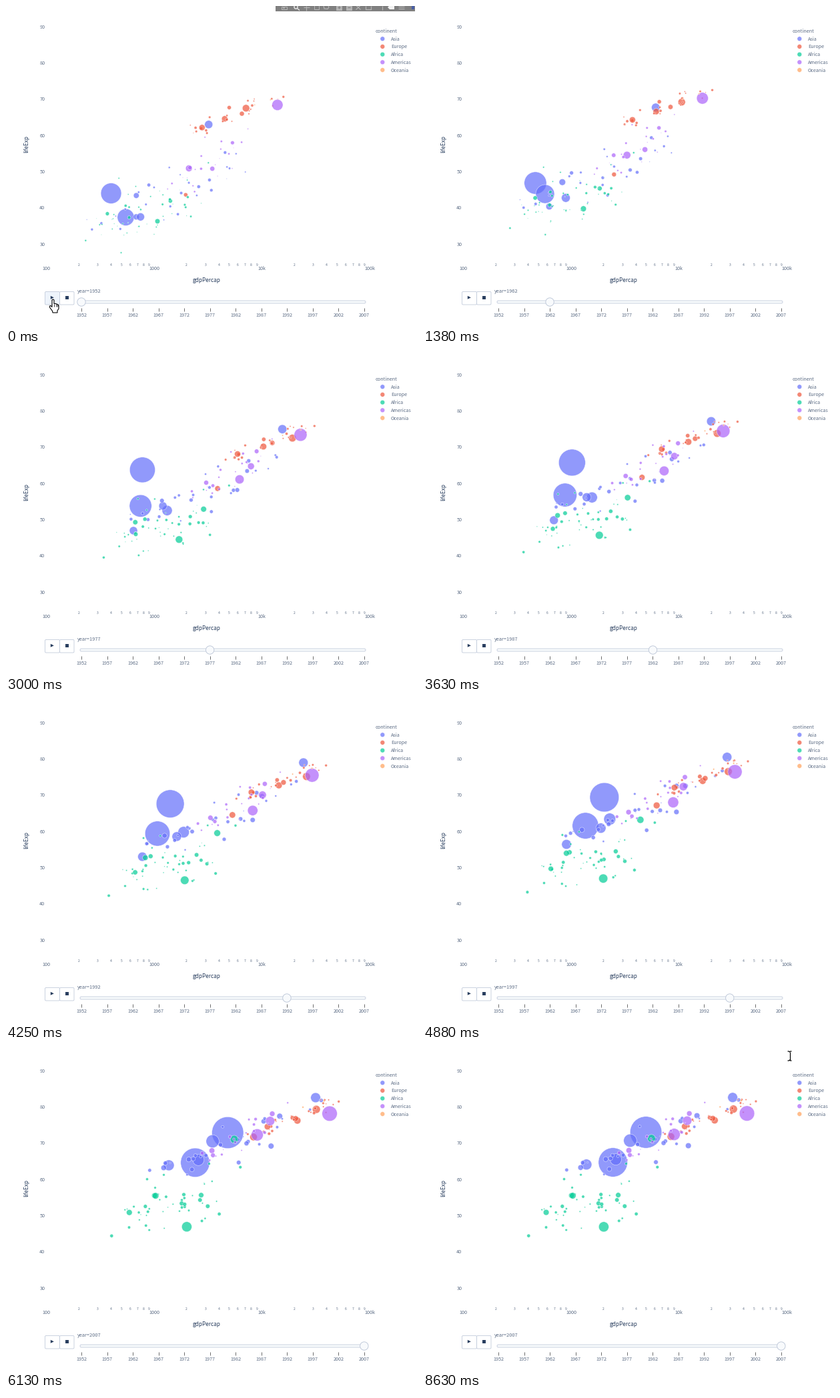
Write a matplotlib script that moves like this. It is 616x480 px and loops after 8.76 s.

```python
import numpy as np
import matplotlib.pyplot as plt
from matplotlib.animation import FuncAnimation
from matplotlib.patches import Circle, FancyBboxPatch, Polygon, Rectangle

W, H, DPI = 616, 480, 100
PX = 72 / DPI
STEP_MS, N_FRAMES = 60, 146
TICKS, TICK_MS = 70, 8760 / 70
START_MS, YEAR_MS, MOVE_MS = 12, 514, 500
INK, EDGE, PALE = "#2a3f5f", "#bec8d9", "#f8fafc"
plt.rcParams["font.family"] = ["Noto Sans CJK JP", "DejaVu Sans"]

COLORS = {"Asia": "#636efa", "Europe": "#ef553b", "Africa": "#00cc96",
          "Americas": "#ab63fa", "Oceania": "#ffa15a"}
U = np.linspace(0, 1, 12)

# Largest bubbles: populations (millions), then (income, life expectancy)
# at the start, middle and end of the period.
LARGE = {
    "Asia": [((372, 1110), (547, 37.4), (815, 55.5), (2452, 64.7)),
             ((47, 150), (684, 37.5), (668, 48.5), (1391, 64.1)),
             ((82, 223), (750, 37.5), (1450, 54.5), (3541, 70.7)),
             ((86, 127), (3217, 63), (18000, 76.2), (31656, 82.6)),
             ((41, 169), (685, 43.4), (1310, 55.1), (2606, 65.5))],
    "Europe": [((69, 82), (7144, 67.5), (21200, 73.2), (32170, 79.4)),
               ((22, 71), (1969, 43.6), (4250, 60.3), (8458, 71.8))],
    "Africa": [((33, 135), (1077, 36.3), (1780, 45.2), (2014, 46.9)),
               ((22, 80), (1419, 41.9), (3140, 54.6), (5581, 71.3))],
    "Americas": [((158, 301), (13990, 68.4), (24500, 74), (42952, 78.2)),
                 ((57, 190), (2109, 50.9), (6850, 62.4), (9066, 72.4)),
                 ((30, 109), (3478, 50.8), (8600, 66.3), (11978, 76.2))],
}

# Everyone else: count, median population, its growth, (log income, life)
# at start and end, income spread, life per decade of income, life noise, bend
CLOUDS = {
    "Asia": (27, 7, 2.6, (3.2, 46), (3.7, 70.5), .4, 11, 4, .35),
    "Europe": (28, 8, 1.2, (3.74, 65.5), (4.33, 77.3), .22, 11, 1.3, .15),
    "Africa": (50, 3.2, 3.3, (2.95, 39), (3.15, 53.5), .27, 8, 4.5, .8),
    "Americas": (22, 4, 2.4, (3.5, 53), (3.86, 73), .2, 13, 3, .4),
    "Oceania": (2, 4, 2.2, (4.01, 69.2), (4.47, 80.7), .05, 8, .2, -.1),
}


def px_x(log_income):
    return 60.3 + 161.5 * (log_income - 2)


def px_y(life):
    return 31 + 5.435 * (90 - life)


def diameter(pop):
    return 47.5 * np.sqrt(pop / 1318.7)


def ramp(a, b):
    return a + (b - a) * U


def parabola(a, b, c):
    """Curve through the start, middle and end values."""
    return ramp(a, c) + (4 * b - 2 * a - 2 * c) * U * (1 - U)


def track(pops, log_income, life):
    return px_x(log_income), px_y(life), ramp(*diameter(np.array(pops)))


def giant():
    """The biggest bubble: steady growth with one sharp early dip."""
    life = 57.5 + 15.5 * U - 13.5 * np.exp(-U / .14)
    life -= 12 * np.exp(-((U - 2 / 11) / .05) ** 2)
    return track((556, 1318.7), parabola(*np.log10([400, 900, 4959])), life)


def large(pops, *points):
    income, life = zip(*points)
    return track(pops, parabola(*np.log10(income)), parabola(*life))


def cloud(rng, n, pop, growth, start, end, spread, slope, noise, bend):
    (g0, l0), (g1, l1) = start, end
    for z in rng.permutation(np.linspace(-1.7, 1.7, n)):
        d0, d1 = spread * (z + rng.normal(0, .35, 2))
        e0, e1 = rng.normal(0, noise, 2)
        p = pop * np.exp(np.clip(rng.normal(0, 1.1), -2.2, 1.8))
        first = l0 + slope * d0 + e0
        last = min(l1 + slope * d1 + .5 * e0 + .6 * e1, 82)
        yield track((p, p * growth * rng.uniform(.8, 1.2)),
                    ramp(g0 + d0, g1 + d1) + .25 * U * (1 - U),
                    ramp(first, last) + bend * (last - first) * U * (1 - U))


def build_tracks():
    rng = np.random.default_rng(7)
    tracks, hues = [giant()], [COLORS["Asia"]]
    for name, spec in CLOUDS.items():
        group = [large(*row) for row in LARGE.get(name, [])]
        group += cloud(rng, *spec)
        tracks += group
        hues += [COLORS[name]] * len(group)
    return np.array(tracks), hues


fig = plt.figure(figsize=(W / DPI, H / DPI), dpi=DPI, facecolor="white")
ax = fig.add_axes([0, 0, 1, 1])
ax.set_xlim(0, W)
ax.set_ylim(H, 0)
ax.axis("off")


def label(x, y, s, size=7.2, ha="center", alpha=.75):
    return ax.text(x, y + .36 * size, s, fontsize=size * PX, ha=ha,
                   va="baseline", color=INK, alpha=alpha)


def line(xs, ys, color, width=1, z=3):
    return ax.plot(xs, ys, color=color, lw=width * PX, zorder=z,
                   solid_capstyle="butt")[0]


def rect(x, y, w, h, fill, edge="none", z=2):
    return ax.add_patch(Rectangle((x, y), w, h, fc=fill, ec=edge,
                                  lw=PX, zorder=z))


def disc(x, y, r, fill, edge="none", width=1, z=4):
    return ax.add_patch(Circle((x, y), r, fc=fill, ec=edge,
                               lw=width * PX, zorder=z))


def rounded(x, y, w, h, r, fill):
    return ax.add_patch(FancyBboxPatch(
        (x, y), w, h, boxstyle=f"round,pad=0,rounding_size={r}",
        fc=fill, ec=EDGE, lw=.8 * PX, zorder=2))


def dots(x, y, sizes, hues):
    return ax.scatter(x, y, s=(sizes * PX) ** 2, c=hues, alpha=.7,
                      edgecolors="white", linewidths=.58 * PX, zorder=2)


def slot(i):
    return 113 + 38.53 * i


def draw_axes():
    for v in range(30, 91, 10):
        label(58.3, px_y(v), str(v), ha="right")
    for i, s in enumerate(["100", "1000", "10k", "100k"]):
        label(px_x(2 + i) + .5, 393, s)
        if i < 3:
            for d in range(2, 10):
                label(px_x(2 + i + np.log10(d)), 388.7, str(d), 5)
    label(300.5, 411, "gdpPercap", 8.3, alpha=1)
    ax.text(31, 207, "lifeExp", fontsize=8.3 * PX, rotation=90,
            ha="center", va="center", color=INK)


def draw_legend():
    label(554, 37.5, "continent", 7.4, "left")
    ys = 49.2 + 11.7 * np.arange(5)
    dots(np.full(5, 564.3), ys, np.full(5, 6.8), list(COLORS.values()))
    for name, y in zip(COLORS, ys):
        label(577, y, name, 7.2, "left")


def draw_controls():
    play = rounded(58.5, 428.5, 22, 19.5, 1.5, "white")
    rounded(80.5, 428.5, 21.5, 19.5, 1.5, "white")
    ax.add_patch(Polygon([(66.8, 434.8), (66.8, 439.8), (71.8, 437.3)],
                         fc=INK, zorder=3))
    rect(89.2, 435.2, 4.4, 4.4, INK)
    rounded(111, 442, 428, 4, 2, PALE)
    for i in range(12):
        line([slot(i)] * 2, [452.8, 458], "#333333", .7)
        label(slot(i), 463.6, str(1952 + 5 * i))
    return play


def draw_toolbar():
    bar, dim, lit = "#808080", "#b4b4b4", "#f2f2f2"
    parts = [rect(404, 0, 208.5, 8.3, bar, z=5)]

    def stroke(xs, ys, c=dim):
        parts.append(line(xs, ys, c, 1.2, 6))

    def box(x, y, w, h, fill="none"):
        parts.append(rect(x, y, w, h, fill, dim, 6))

    box(412.5, .5, 8, 4.5)
    parts.append(disc(416.5, 2.8, 1.3, dim, z=6))
    parts.append(disc(434.5, 1.5, 2.6, "none", lit, 1.3, 6))
    stroke([436.3, 440], [3.3, 6.5], lit)
    stroke([445.5, 454.5], [2, 2])
    stroke([450, 450], [0, 6.5])
    box(461.5, -2, 7, 7)
    stroke([476, 477, 482, 484, 483], [0, 4, 4.5, 2, 0])
    for x in (495, 510):
        box(x, -2, 7.5, 7.5, dim)
        stroke([x + 1.5, x + 6], [1.8, 1.8], bar)
    stroke([498.7, 498.7], [0, 4], bar)
    stroke([524.5, 531.5], [-1, 5.5])
    stroke([531.5, 524.5], [-1, 5.5])
    stroke([539, 539, 547, 547], [0, 5, 5, 0])
    stroke([563.5, 563.5], [0, 5.5])
    parts.append(ax.add_patch(Polygon(
        [(572, 2), (575, -1), (582, -1), (582, 5), (575, 5)],
        fc=lit, zorder=6)))
    for y in (.8, 4):
        stroke([588, 597], [y, y])
    parts.append(rect(607.5, 0, 4.5, 4.5, "#4a5fa5", z=6))
    return parts


def draw_hand():
    outline = [(69, 441), (70.5, 440), (72, 441), (72, 446.5), (74.5, 446.5),
               (77, 447.5), (79, 449), (79, 454), (77, 457), (77, 460),
               (70, 460), (69.5, 457.5), (65.5, 452), (65.5, 450),
               (67, 449.5), (69, 451.5)]
    parts = [ax.add_patch(Polygon(outline, fc="white", ec="black",
                                  lw=1.1 * PX, zorder=8))]
    for x in (72, 74.5, 76.8):
        parts.append(line([x, x], [447, 450.5], "black", .8, 9))
    return parts


def draw_beam(x=549.5, y=9):
    serif = x + np.array([-3, -1, 0, 1, 3])
    parts = [line([x, x], [y - 6, y + 6], "black", 1.2, 8)]
    for s in (-1, 1):
        parts.append(line(serif, y + s * np.array([7, 7, 6, 7, 7]),
                          "black", 1.2, 8))
    return parts


tracks, hues = build_tracks()
draw_axes()
draw_legend()
play_button = draw_controls()
bubbles = dots(*tracks[:, :, 0].T, hues)
bubbles.set_clip_path(Rectangle((60, 20), 485, 366, transform=ax.transData))
knob = disc(slot(0), 444, 6.2, PALE, EDGE, .9)
year = label(107, 427.8, "year=1952", 7.4, "left")
toolbar, hand, beam = draw_toolbar(), draw_hand(), draw_beam()


def ease(u):
    u = min(u, 1)
    return 4 * u**3 if u < .5 else 1 - 4 * (1 - u)**3


def show(parts, on):
    for p in parts:
        p.set_visible(on)


def update(i):
    # The picture advances in 70 even ticks per loop.
    t = min(int((i + 1) * STEP_MS / TICK_MS), TICKS - 1) * TICK_MS
    step = int(np.clip((t - START_MS) // YEAR_MS, 0, 11))
    since = max(t - START_MS - YEAR_MS * step, 0)
    prev = max(step - 1, 0)

    f = min(since / MOVE_MS, 1)
    now = tracks[:, :, prev] * (1 - f) + tracks[:, :, step] * f
    bubbles.set_offsets(now[:, :2])
    bubbles.set_sizes((now[:, 2] * PX) ** 2)

    knob.center = (slot(prev + (step - prev) * ease(since / 150)), 444)
    year.set_text(f"year={1952 + 5 * step}")

    hovering = t < 240
    play_button.set_facecolor("#eef4fb" if hovering else "white")
    show(hand, hovering)
    show(toolbar, t < 490)
    show(beam, t > 7990)
    return []


anim = FuncAnimation(fig, update, frames=N_FRAMES, interval=STEP_MS,
                     init_func=lambda: update(0), repeat=True,
                     repeat_delay=0, blit=False)
plt.show()
```
